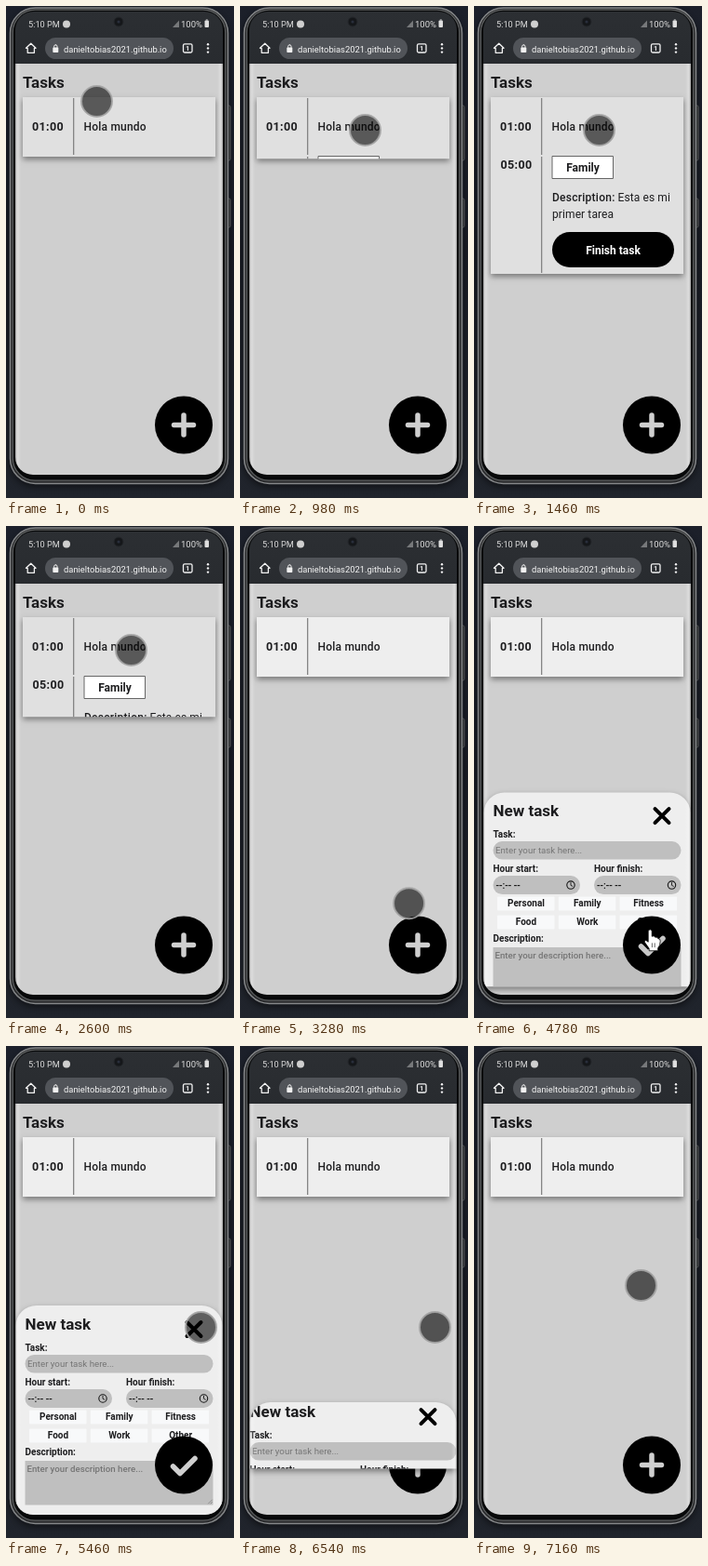
An HTML page with a canvas for the animation above (7180 ms loop, 245 by 529 pixels).

```html
<!DOCTYPE html>
<html lang="es">
<head>
<meta charset="utf-8">
<title>Tasks</title>
<style>
html, body { margin: 0; width: 100%; height: 100%; overflow: hidden; background: #1b1f28; }
canvas { display: block; width: 245px; height: 529px; }
</style>
</head>
<body>
<canvas id="stage"></canvas>
<script>
const LOOP = 7180, W = 245, H = 529, BOTTOM = 504;
const canvas = document.getElementById('stage');
const scale = window.devicePixelRatio || 1;
canvas.width = W * scale;
canvas.height = H * scale;
const c = canvas.getContext('2d');

const clamp = v => Math.max(0, Math.min(1, v));
const mix = (a, b, k) => a + (b - a) * k;

// CSS "ease": cubic-bezier(.25, .1, .25, 1)
function ease(x) {
  x = clamp(x);
  let lo = 0, hi = 1, s = x;
  for (let i = 0; i < 24; i++) {
    s = (lo + hi) / 2;
    const r = 1 - s;
    if (.75 * r * r * s + .75 * r * s * s + s * s * s < x) lo = s; else hi = s;
  }
  const r = 1 - s;
  return .3 * r * r * s + 3 * r * s * s + s * s * s;
}
const progress = (t, start, length) => ease((t - start) / length);

const curves = {
  both: k => k * k * (3 - 2 * k),
  in: k => k * k,
  out: k => 1 - (1 - k) * (1 - k),
  line: k => k
};
// time, x, y, curve used to arrive there
const path = [
  [80, 97.5, 102.5], [580, 134.5, 133.5, 'both'], [2720, 134.5, 133.5, 'line'],
  [3120, 167.5, 307.5, 'in'], [3280, 181.5, 405.5, 'line'], [3520, 189, 435.5, 'out'],
  [4740, 189, 435.5, 'line'], [5460, 209.5, 302.5, 'both'],
  [6600, 209.5, 302.5, 'line'], [6980, 179.5, 257.5, 'both']
];
function pointer(t) {
  const i = path.findIndex(p => p[0] > t);
  if (i < 1) return (i ? path[path.length - 1] : path[0]).slice(1, 3);
  const a = path[i - 1], b = path[i];
  const k = curves[b[3]]((t - a[0]) / (b[0] - a[0]));
  return [mix(a[1], b[1], k), mix(a[2], b[2], k)];
}

function box(x, y, w, h, r, fill, stroke, line = 1) {
  c.beginPath();
  c.roundRect(x, y, w, h, r);
  if (fill) { c.fillStyle = fill; c.fill(); }
  if (stroke) { c.strokeStyle = stroke; c.lineWidth = line; c.stroke(); }
}
function disc(x, y, r, fill, stroke, line = 1) {
  c.beginPath();
  c.arc(x, y, r, 0, 7);
  if (fill) { c.fillStyle = fill; c.fill(); }
  if (stroke) { c.strokeStyle = stroke; c.lineWidth = line; c.stroke(); }
}
function lines(points, color, width) {
  c.beginPath();
  points.forEach(([x, y, move], i) => i && !move ? c.lineTo(x, y) : c.moveTo(x, y));
  c.strokeStyle = color;
  c.lineWidth = width;
  c.lineCap = c.lineJoin = 'round';
  c.stroke();
}
function text(str, x, y, size, weight = 400, color = '#1d1d1f', align = 'left', gap = 0) {
  c.font = `${weight} ${size}px Roboto, sans-serif`;
  c.letterSpacing = gap + 'px';
  c.textAlign = align;
  c.fillStyle = color;
  c.fillText(str, x, y);
}
function fade(x0, y0, x1, y1, ...stops) {
  const g = c.createLinearGradient(x0, y0, x1, y1);
  stops.forEach((s, i) => g.addColorStop(i / (stops.length - 1), s));
  return g;
}
function shadowed(draw) {
  c.save();
  c.shadowColor = 'rgba(0,0,0,.42)';
  c.shadowBlur = 6 * scale;
  c.shadowOffsetY = 3 * scale;
  draw();
  c.restore();
}

function phone() {
  c.fillStyle = fade(0, 0, 0, H, '#1c202a', '#181b23', '#20242c');
  c.fillRect(0, 0, W, H);
  for (const [y, h] of [[107, 59], [207, 31]]) box(237.5, y, 3.5, h, 1.5, '#2c2e31', '#66686a');
  shadowed(() => box(4.5, 2, 234, 511.5, 27, '#2c2d2f', '#858789', 1.5));
  box(7.3, 4.2, 228.4, 506, 24, '#08090a', '#5d5f60', 1.2);
}

function browserBar() {
  c.fillStyle = fade(0, 5, 0, 62, '#2c2f33', '#2a2d31', '#282b2f');
  c.fillRect(10, 5, 223, 57);
  disc(121, 17, 5, '#15171a', '#24272b');
  disc(121, 17, 1.6, '#292e3b');
  text('5:10 PM', 24, 23, 9.2, 400, '#d8d8d8');
  disc(65, 19.5, 4, '#cfcfcf');
  c.beginPath();
  c.moveTo(179, 23); c.lineTo(186, 23); c.lineTo(186, 15.5);
  c.fillStyle = '#77797b';
  c.fill();
  text('100%', 188, 23, 9.5, 400, '#dedede');
  box(213.5, 15.5, 4.5, 7.5, 1, '#dedede');
  c.fillStyle = '#dedede';
  c.fillRect(214.8, 14.5, 2, 1);

  lines([[21.5, 45.3], [26.8, 40.2], [32, 45.3], [30.4, 45.3], [30.4, 50.3], [23.2, 50.3], [23.2, 45.3], [21.5, 45.3]], '#f2f2f2', 1.3);
  box(42, 34, 138, 23, 11.5, '#515459');
  box(50.3, 44.6, 6, 5.4, .8, '#f0f0f0');
  box(51.6, 41.8, 3.4, 4.5, 1.7, null, '#f0f0f0', 1);
  text('danieltobias2021.github.io', 62, 50, 9.4, 400, '#f4f4f4');
  box(190.5, 40.8, 9.5, 9.2, 1.5, null, '#f2f2f2', 1.3);
  text('1', 195.2, 48.2, 7.5, 700, '#f2f2f2', 'center');
  for (const y of [41.2, 45.4, 49.6]) disc(217, y, 1.2, '#f2f2f2');
}

function card(open, hover) {
  const h = 64 + 126 * open;
  shadowed(() => box(18, 98, 207, h, 0, hover ? '#e0e0e0' : '#eeeeee'));
  c.save();
  c.beginPath();
  c.rect(18, 98, 207, h);
  c.clip();
  c.fillStyle = '#858585';
  c.fillRect(72, 99, 1.3, 61);
  text('01:00', 28, 134, 12.5, 700, '#1d1d1f', 'left', .35);
  text('Hola mundo', 83.5, 134, 12, 500, '#1d1d1f', 'left', .2);
  if (open > 0) {
    c.fillStyle = '#858585';
    c.fillRect(72, 162, 1.3, 125);
    text('05:00', 28.5, 175, 12.5, 700, '#1d1d1f', 'left', .35);
    box(84, 161.5, 65.5, 24, 0, '#fff', '#666');
    text('Family', 117, 178, 12, 700, '#1d1d1f', 'center');
    text('Description:', 84, 210, 12, 500, '#1d1d1f', 'left', .25);
    text('Esta es mi', 154.5, 210, 12, 400, '#1d1d1f', 'left', .1);
    text('primer tarea', 84, 228, 12, 400, '#1d1d1f', 'left', .1);
    box(84, 243, 131, 38, 19, '#000');
    text('Finish task', 149.5, 267, 12, 700, '#fff', 'center');
  }
  c.restore();
}

function timeField(x, w) {
  const cx = x + w - 10;
  box(x, 369, w, 20, 10, '#bfbfbf');
  text('--:-- --', x + 3, 382.5, 10.5, 500, '#111');
  disc(cx, 379, 4.2, null, '#151515', 1.1);
  lines([[cx, 376.4], [cx, 379.2], [cx + 1.8, 380.2]], '#151515', .9);
}

// Fields are laid out for the fully open panel, whose top is at 279.
function panel(open, closing) {
  const rise = 225 * open, top = BOTTOM - rise;
  const gap = open * (1 - open) * (111 + 163 * open);
  const h = rise - gap;
  if (rise < 1.5) return;
  const pad = closing ? 0 : 10;
  const left = 10.5 + pad, right = 232.5 - pad;
  const corners = [22, 22, 0, 0];
  shadowed(() => box(10.5, top, 222, h, corners, '#eeeeee'));
  c.save();
  c.beginPath();
  c.roundRect(10.5, top, 222, h, corners);
  c.clip();
  c.translate(0, top - 279 - (closing ? 10 : 11 * (1 - open)));

  text('New task', left, 305, 17, 700);
  lines([[194.5, 297], [209.5, 312], [209.5, 297, 1], [194.5, 312]], '#000', 4);
  text('Task:', left, 327.5, 10, 700);
  box(left, 332, right - left, 19.5, 10, '#bfbfbf');
  text('Enter your task here...', left + 2.5, 345, 9.7, 400, '#757575');
  text('Hour start:', left, 364.5, 10, 700);
  text('Hour finish:', 129, 364.5, 10, 700);
  timeField(left, 114 - left);
  timeField(129, right - 129);
  ['Personal', 'Family', 'Fitness', 'Food', 'Work', 'Other'].forEach((name, i) => {
    const x = 25 + i % 3 * 65.8, y = i < 3 ? 391.5 : 411.5;
    box(x, y, 61.5, 15, 1, '#f8f9fa');
    text(name, x + 31, y + 10.7, 10, 700, '#1d1d1f', 'center');
  });
  text('Description:', left, 440, 10, 700);
  box(left, 446, right - left, 47.5, 0, '#bfbfbf');
  text('Enter your description here...', left + 2, 458, 9.7, 500, '#757575');
  lines([[right - 5, 492], [right - 1, 488], [right - 2.5, 492, 1], [right - 1, 490.5]], '#777', .7);
  c.restore();
}

function roundButton(check, alpha) {
  disc(191, 450.5, 31, '#000');
  c.save();
  c.globalAlpha = alpha;
  if (check) lines([[179.5, 452], [187, 459.5], [203, 443.5]], '#cfcfcf', 5.5);
  else lines([[180.5, 450.5], [201.5, 450.5], [191, 440, 1], [191, 461]], '#cfcfcf', 5.5);
  c.restore();
}

function hand(x, y) {
  c.save();
  c.translate(x, y);
  c.beginPath();
  c.moveTo(-2, 1);
  c.quadraticCurveTo(0, -2, 2, 1);
  c.lineTo(2, 7);
  c.quadraticCurveTo(4.5, 5.5, 5.5, 8);
  c.quadraticCurveTo(8, 7, 8.7, 9.5);
  c.quadraticCurveTo(11, 9, 11, 12);
  c.quadraticCurveTo(11, 17, 8.5, 19.5);
  c.lineTo(8.5, 22.5);
  c.lineTo(-1, 22.5);
  c.lineTo(-1, 20);
  c.lineTo(-6, 13);
  c.quadraticCurveTo(-6, 9.5, -2, 13);
  c.closePath();
  c.fillStyle = '#fff';
  c.fill();
  c.strokeStyle = '#000';
  c.lineWidth = .8;
  c.stroke();
  lines([[2.2, 14.5], [2.2, 18.5], [5, 14.5, 1], [5, 18.5]], '#000', .6);
  c.restore();
}

function render(t) {
  const [x, y] = pointer(t);
  const cardOpen = progress(t, 965, 500) - progress(t, 2410, 500);
  const closing = t >= 6266;
  const open = closing ? 1 - progress(t, 6266, 1000) : progress(t, 4012, 1000);
  const check = t >= 4012 && !closing;
  const hover = y > 97 && y < 162 + 126 * cardOpen;

  c.setTransform(scale, 0, 0, scale, 0, 0);
  phone();
  c.save();
  c.beginPath();
  c.roundRect(10, 6, 223, BOTTOM - 6, [20, 20, 19, 19]);
  c.clip();
  c.fillStyle = '#cfcfcf';
  c.fillRect(10, 62, 223, 442);
  text('Tasks', 18, 88, 17, 700);
  card(cardOpen, hover);
  if (!check) roundButton(false, 1);
  panel(open, closing);
  if (check) roundButton(true, open);
  browserBar();
  // curved glass at both sides
  const glass = ['rgba(0,0,0,.15)', 'rgba(255,255,255,.3)', 'rgba(255,255,255,.15)', 'rgba(255,255,255,0)'];
  c.fillStyle = fade(10, 0, 16, 0, ...glass);
  c.fillRect(10, 62, 6, 442);
  c.fillStyle = fade(233, 0, 227, 0, ...glass);
  c.fillRect(227, 62, 6, 442);
  c.restore();

  if (Math.hypot(x - 191, y - 450.5) < 31) hand(x, y);
  else disc(x, y, 16.5, 'rgba(0,0,0,.6)', 'rgba(165,165,165,.9)', 2);
}

function tick() {
  render(performance.now() % LOOP);
  requestAnimationFrame(tick);
}
tick();
</script>
</body>
</html>
```
